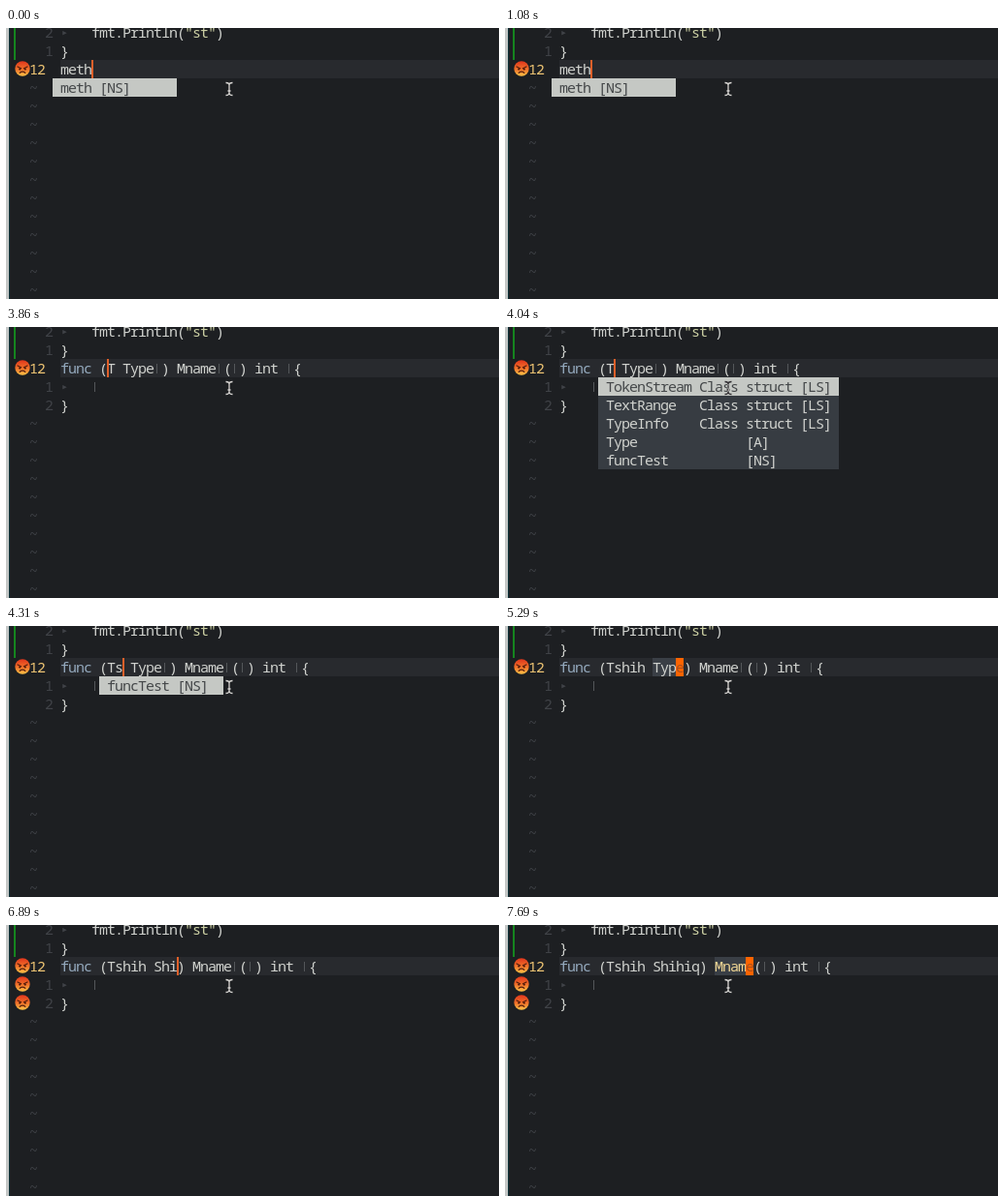
These frames come from a looping animation (508x280 px, 8000 ms). An HTML page:

```html
<!DOCTYPE html>
<html lang="en">
<head>
<meta charset="utf-8">
<title>Snippet expansion</title>
<style>
  html, body { margin: 0; width: 100%; height: 100%; overflow: hidden; background: #1d1f22; }
  #stage { position: relative; width: 508px; height: 280px; overflow: hidden; background: #1d1f22; }
  #stage > div, #code > div, svg { position: absolute; }
  .row {
    height: 19px; white-space: pre; color: #d0d2ce;
    font: 15px/19px "Noto Sans Mono", "DejaVu Sans Mono", monospace;
    letter-spacing: calc(8px - 1ch); font-variant-ligatures: none;
  }
  .dim { color: #404348; }
  .num { color: #f0c674; }
  .key { color: #94a9bd; }
  .str { color: #ccd0a4; }
  .name { color: #f0d694; }
  .mark, .caret, .sel, .block { display: inline-block; height: 19px; vertical-align: top; }
  .mark { width: 8px; background: linear-gradient(#54575a, #54575a) 3px 5px / 1px 10px no-repeat; }
  .caret { width: 2px; margin-right: -2px; background: #e0602a; position: relative; }
  .sel { background: #3a3f46; }
  .block { background: #ff6400; color: #a8501c; }
  .item { background: #373c42; }
  .item.on { background: #c5c8c4; color: #45484a; }
  #pointer { left: 225px; top: 55px; mix-blend-mode: difference; }
</style>
</head>
<body>
<div id="stage">
  <div style="left:0;top:0;width:3px;height:280px;background:#c3c6c5"></div>
  <div style="left:3px;top:0;width:1px;height:280px;background:#0d3138"></div>
  <div style="left:8px;top:0;width:2px;height:33px;background:#15851f"></div>
  <div style="left:56px;top:33px;width:452px;height:19px;background:#282a2e"></div>
  <div id="code"></div>
  <svg id="pointer" width="10" height="16" fill="none" stroke="#f4f4f4" stroke-width="1.3">
    <path d="M1.5 1.5Q5 1.5 5 4V12Q5 14.5 1.5 14.5M8.5 1.5Q5 1.5 5 4M5 12Q5 14.5 8.5 14.5M3.5 10H6.5"/>
  </svg>
</div>
<script>
const CELL = 8, LINE = 19, TOP = 33, LEFT = 56, LOOP = 8000;
const code = document.getElementById('code');

// Line markup: | placeholder mark, ^ caret, <..> selection ending in the block cursor.
const method = (recv, name = 'Mname|') => `func (${recv}) ${name}(|) int |{`;

const snippet = { x: 48, on: 0, items: ['meth [NS]'] };
const types = { x: 96, on: 0, items: [
  'TokenStream Class struct [LS]',
  'TextRange   Class struct [LS]',
  'TypeInfo    Class struct [LS]',
  'Type              [A]',
  'funcTest          [NS]'] };
const test = { x: 96, on: 0, items: ['funcTest [NS]'], cols: 16 };
const symbols = { x: 144, on: 0, items: [
  'SymbolCollector Class struct [LS]',
  'Server                [A]'] };
snippet.cols = 16;
types.cols = 31;
symbols.cols = 35;

// start time, current line, menu, error signs
const steps = [
  [0, 'meth^', snippet, 1],
  [540, 'meth^', { ...snippet, on: -1 }, 1],
  [1080, 'meth^', snippet, 1],
  [1620, method('^tname Type|'), null, 1],
  [1710, method('<tname> Type|'), null, 1],
  [3860, method('^T Type|'), null, 1],
  [3950, method('T^ Type|'), null, 1],
  [4040, method('T^ Type|'), types, 1],
  [4310, method('Ts^ Type|'), test, 1],
  [4490, method('Tshi^ Type|'), null, 1],
  [4670, method('Tshih^ Type|'), null, 1],
  [5200, method('Tshih ^Type'), null, 1],
  [5290, method('Tshih <Type>'), null, 1],
  [6280, method('Tshih ^S'), null, 1],
  [6370, method('Tshih S^'), null, 1],
  [6450, method('Tshih S^'), null, 3],
  [6540, method('Tshih S^'), symbols, 3],
  [6800, method('Tshih Sh^'), null, 3],
  [6890, method('Tshih Shi^'), null, 3],
  [6980, method('Tshih Shih^'), null, 3],
  [7070, method('Tshih Shihiq^'), null, 3],
  [7600, method('Tshih Shihiq', '^Mname'), null, 3],
  [7690, method('Tshih Shihiq', '<Mname>'), null, 3]
];

const span = (cls, text = '') => `<span class="${cls}">${text}</span>`;
const rowY = n => TOP + n * LINE;

function row(x, n, html, cls = '', style = '') {
  return `<div class="row ${cls}" style="left:${x}px;top:${rowY(n)}px;${style}">${html}</div>`;
}

function markup(line) {
  return line.replace(/<(\w+)(\w)>|\||\^|^func/g, (all, head, last) => {
    if (all === '|') return span('mark');
    if (all === '^') return span('caret');
    if (all === 'func') return span('key', all);
    return span(head === 'Mnam' ? 'sel name' : 'sel', head) + span('block', last);
  });
}

function angryFace(n) {
  return `<svg style="left:9px;top:${rowY(n) + 1}px" width="16" height="16" viewBox="0 0 16 16">
    <defs><linearGradient id="heat" x2="0" y2="1">
      <stop offset="0" stop-color="#e2361c"/><stop offset=".55" stop-color="#f0722a"/>
      <stop offset="1" stop-color="#ffc246"/></linearGradient></defs>
    <circle cx="8" cy="8" r="7.7" fill="url(#heat)"/>
    <g stroke="#541c0c" stroke-width="1.2" stroke-linecap="round" fill="none">
      <path d="M3 6L6.6 7.8M13 6L9.4 7.8M5.2 12.3Q8 10 10.8 12.3"/></g>
    <circle cx="5.2" cy="8.6" r="1.1" fill="#541c0c"/>
    <circle cx="10.8" cy="8.6" r="1.1" fill="#541c0c"/></svg>`;
}

function menuRows({ x, items, on, cols }) {
  return items.map((text, i) =>
    row(x, i + 1, ' ' + text, i === on ? 'item on' : 'item', `width:${cols * CELL}px`)).join('');
}

function draw([, line, menu, signs]) {
  const expanded = line.startsWith('func');
  const number = (n, v) => row(40, n, v, 'dim');
  let html = number(-2, 2) + row(LEFT, -2, '▸', 'dim') +
    row(LEFT + 4 * CELL, -2, `fmt.Println(${span('str', '"st"')})`) +
    number(-1, 1) + row(LEFT, -1, '}') +
    row(24, 0, '12', 'num') + row(LEFT, 0, markup(line));
  if (expanded) {
    html += number(1, 1) + row(LEFT, 1, '▸', 'dim') +
      row(LEFT + 4 * CELL, 1, span('mark')) +
      number(2, 2) + row(LEFT, 2, '}');
  }
  for (let n = expanded ? 3 : 1; n < 13; n++) html += row(24, n, '~', 'dim');
  for (let n = 0; n < signs; n++) html += angryFace(n);
  if (menu) html += menuRows(menu);
  code.innerHTML = html;
}

let shown = null;
const start = performance.now();
function tick(now) {
  const t = Math.max(0, now - start) % LOOP;
  const step = steps.findLast(s => s[0] <= t);
  if (step !== shown) draw(shown = step);
  requestAnimationFrame(tick);
}
tick(start);
</script>
</body>
</html>
```
